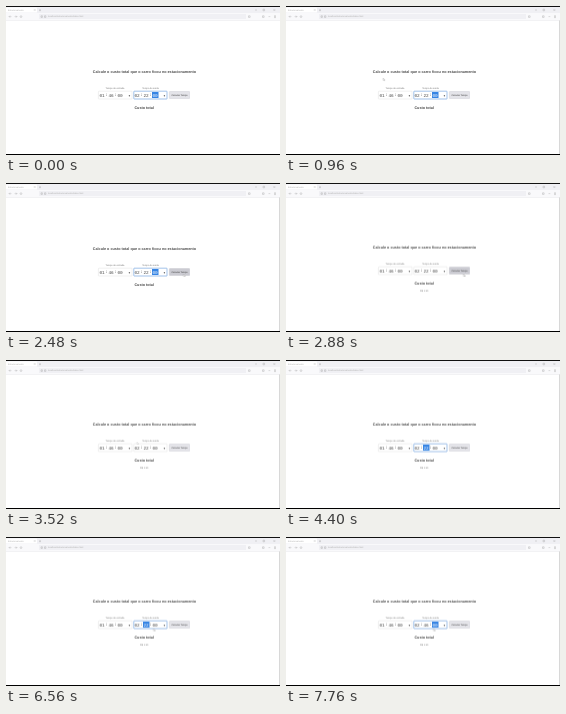
An HTML page for the animation above (8 s loop, 274x149 px).

```html
<!DOCTYPE html>
<html lang="pt">
<head>
<meta charset="utf-8">
<title>Estacionamento</title>
<style>
html, body { margin: 0; width: 100%; height: 100%; overflow: hidden; background: #fff; }
svg { display: block; width: 274px; height: 149px; }
text { font-family: "Liberation Sans", Arial, sans-serif; text-rendering: geometricPrecision; text-anchor: middle; fill: #444; }
.head { font-size: 3.76px; font-weight: bold; fill: #4c4c4c; }
.label { font-size: 2.35px; fill: #707070; }
.time text { font-family: "Liberation Mono", monospace; font-size: 4.4px; fill: #4a4a4a; }
.ui { font-size: 2.2px; text-anchor: start; fill: #aaa; }
.icon { fill: none; stroke: #999; stroke-width: .35; }
.clock { fill: #666; }
.box { fill: #fff; stroke: #ccc; stroke-width: .3; }
.ring { fill: none; stroke: #5b9bea; stroke-width: .5; }
.sel { fill: #3584e4; }
.time .on { fill: #fff; }

.page, .state, .btn, .cursor { animation: 8s step-end infinite; }
.page { animation-name: page; }
.btn { fill: #e4e4e9; stroke: #bcbcc4; stroke-width: .3; animation-name: btn; }
.edge { animation-name: edge; }
.result { animation-name: result; }
.focus { animation-name: focus; }
.sec { animation-name: sec; }
.min { animation-name: min; }
.m22 { animation-name: m22; }
.m04 { animation-name: m04; }
.m46 { animation-name: m46; }
.cursor { animation-name: cursor; animation-timing-function: linear; }

@keyframes page { 0% { transform: none; } 35%, 100% { transform: translateY(-1.4px); } }
@keyframes btn { 0% { fill: #e4e4e9; } 25% { fill: #cbcbd2; } 35% { fill: #b1b1b9; } 36% { fill: #cbcbd2; } 39%, 100% { fill: #e4e4e9; } }
@keyframes edge { 0% { opacity: 0; } 12%, 100% { opacity: 1; } }
@keyframes result { 0% { opacity: 0; } 35%, 100% { opacity: 1; } }
@keyframes focus { 0% { opacity: 1; } 35% { opacity: 0; } 55%, 100% { opacity: 1; } }
@keyframes sec { 0% { opacity: 1; } 35% { opacity: 0; } 97%, 100% { opacity: 1; } }
@keyframes min { 0% { opacity: 0; } 55% { opacity: 1; } 97%, 100% { opacity: 0; } }
@keyframes m22 { 0% { opacity: 1; } 92%, 100% { opacity: 0; } }
@keyframes m04 { 0% { opacity: 0; } 92% { opacity: 1; } 96%, 100% { opacity: 0; } }
@keyframes m46 { 0% { opacity: 0; } 96%, 100% { opacity: 1; } }
@keyframes cursor {
  0%, 2% { transform: translate(150px, 89px); opacity: 0; }
  4% { transform: translate(173px, 93px); opacity: 1; }
  9%, 11.9% { transform: translate(138px, 79px); }
  12% { transform: translate(97px, 72px); }
  15% { transform: translate(120px, 82px); }
  19%, 20.9% { transform: translate(163px, 81px); }
  21%, 22.9% { transform: translate(163px, 77px); }
  25%, 26.9% { transform: translate(177.5px, 89.5px); }
  31%, 37.9% { transform: translate(177.5px, 91px); }
  41% { transform: translate(150px, 66px); }
  43% { transform: translate(121px, 76px); opacity: 1; }
  45%, 55% { transform: translate(140.5px, 87.5px); opacity: 0; }
  59% { transform: translate(152px, 89px); opacity: 0; }
  63%, 100% { transform: translate(147.5px, 91.5px); opacity: 1; }
}
</style>
</head>
<body>
<svg viewBox="0 0 274 149">
  <rect width="274" height="149" fill="#fff"/>
  <rect y="1" width="274" height="6" fill="#f0f0f4"/>
  <rect x="0" y="1.5" width="31" height="5" rx=".6" fill="#fff"/>
  <rect y="7" width="274" height="7" fill="#f9f9fb"/>
  <rect x="33" y="8" width="207" height="5" rx=".6" fill="#f0f0f4"/>
  <rect y="14" width="274" height=".4" fill="#dedee2"/>
  <text class="ui" x="2" y="4.9">Estacionamento</text>
  <text class="ui" x="42" y="11.4">localhost/estacionamento/index.html</text>
  <path class="icon" d="M28 3.3l1.4 1.4m0-1.4l-1.4 1.4M34 3.2v2m-1-1h2M4 9.6l-1 1 1 1m-1-1h2.4M10 9.6l1 1-1 1m1-1H8.6M249 4h2M257 3.2h1.6v1.6h-1.6zM267.5 3.2l1.7 1.7m0-1.7l-1.7 1.7M242.5 9.8h1.6v1.6h-1.6zM256.5 9.8h1.6v1.6h-1.6zM262.5 10.6h1.8M268 9.8h2m-2 .9h2m-2 .9h2M35 9.8h1.4v1.6H35zM38.5 9.8h1.4v1.6h-1.4z"/>
  <circle class="icon" cx="15" cy="10.6" r=".9"/>
  <rect class="state edge" x="273" y="14.4" width="1" height="134" fill="#d8d8d8"/>
  <rect width="274" height="1" fill="#111"/>
  <rect y="148" width="274" height="1" fill="#000"/>

  <g class="page">
    <text class="head" x="138.4" y="67.4">Calcule o custo total que o carro ficou no estacionamento</text>
    <text class="label" x="109" y="83">Tempo de entrada</text>
    <text class="label" x="144.5" y="83">Tempo de saída</text>

    <rect class="box" x="92.4" y="85.2" width="33.6" height="7.8" rx=".5"/>
    <g class="time">
      <text x="96.1" y="90.5">01</text><text x="100.6" y="90.3">:</text>
      <text x="105.1" y="90.5">46</text><text x="109.6" y="90.3">:</text>
      <text x="114.1" y="90.5">00</text>
    </g>
    <circle class="clock" cx="123.4" cy="89.8" r=".7"/>

    <rect class="box" x="127.8" y="85.2" width="33.2" height="7.8" rx=".5"/>
    <rect class="ring state focus" x="127.8" y="85.2" width="33.2" height="7.8" rx=".5"/>
    <g class="time">
      <text x="131.1" y="90.5">02</text><text x="135.6" y="90.3">:</text>
      <text class="state m22" x="140.1" y="90.5">22</text>
      <text class="state m46" x="140.1" y="90.5">46</text>
      <text x="144.6" y="90.3">:</text>
      <text x="149.1" y="90.5">00</text>
      <g class="state min">
        <rect class="sel" x="137" y="86" width="6.5" height="6"/>
        <text class="on state m22" x="140.1" y="90.5">22</text>
        <text class="on state m04" x="140.1" y="90.5">04</text>
        <text class="on state m46" x="140.1" y="90.5">46</text>
      </g>
      <g class="state sec">
        <rect class="sel" x="146" y="86" width="6.5" height="6"/>
        <text class="on" x="149.1" y="90.5">00</text>
      </g>
    </g>
    <circle class="clock" cx="158.4" cy="89.8" r=".7"/>

    <rect class="btn" x="163.3" y="85.5" width="20.4" height="7" rx=".5"/>
    <text class="label" x="173.5" y="89.9" style="fill:#333">Calcular Tempo</text>
    <text class="head" x="138.2" y="103.4">Custo total</text>
    <text class="label state result" x="138.2" y="109.6">R$ 1.50</text>
  </g>

  <path class="cursor" d="M0 0v2.4l.6-.5.4 .9.4-.2-.4-.8h.8z" fill="#fff" stroke="#888" stroke-width=".3"/>
</svg>
</body>
</html>
```
